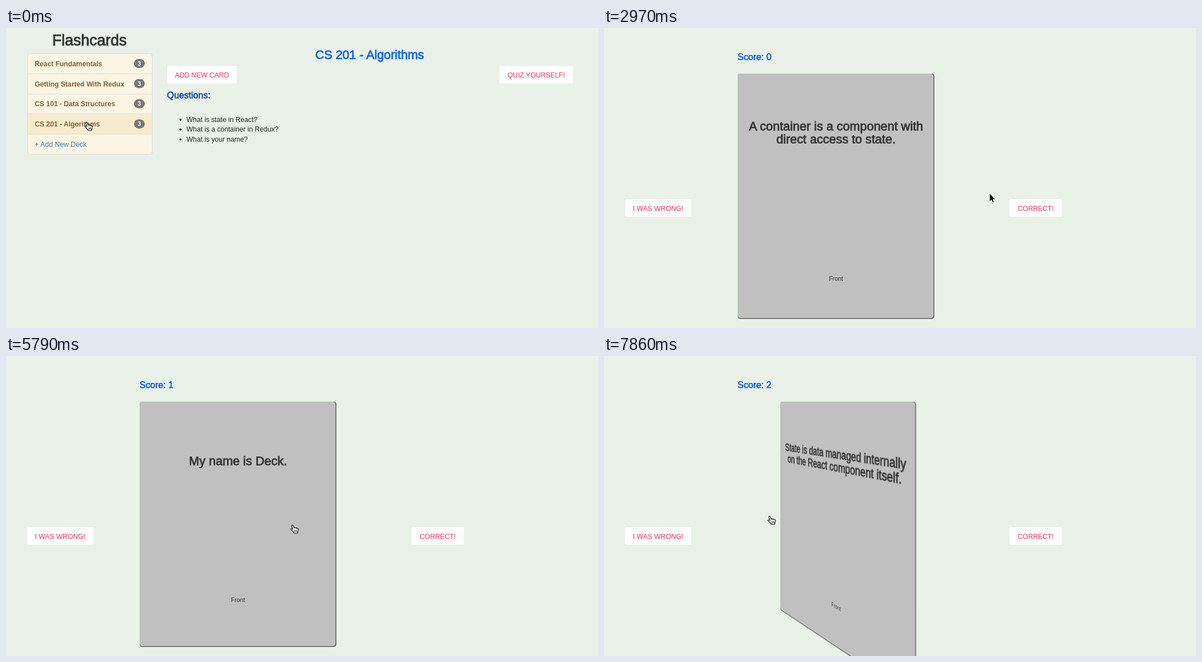
Write an HTML page that moves like this. It is 1050 by 533 pixels and loops after 8 s.

```html
<!DOCTYPE html>
<html lang="en">
<head>
<meta charset="utf-8">
<title>Flashcards</title>
<style>
  html, body { margin: 0; width: 100%; height: 100%; overflow: hidden; background: #eaf1e9; }
  #stage { position: relative; width: 1050px; height: 533px; overflow: hidden; }
  svg { position: absolute; left: 0; top: 0; overflow: visible; font-family: "Liberation Sans", Arial, sans-serif; white-space: pre; }
  #card { left: 237px; top: 81px; transform-origin: 50% 0; }
</style>
</head>
<body>
<div id="stage">
  <svg id="page" width="1050" height="533"><g id="deck"></g><g id="quiz"></g></svg>
  <svg id="card" width="349" height="436"></svg>
  <svg id="pointer" width="1050" height="533">
    <path id="arrow" d="M0 0V13L3 10.2L5 14.6L7 13.8L5.2 9.4H9Z" fill="#000" stroke="#fff" stroke-width=".9" paint-order="stroke"/>
    <g id="hand" fill="#fff" stroke="#000" stroke-width="1.1" stroke-linejoin="round" stroke-linecap="round">
      <path d="M-1.6 1.2C-1.8 -.6 .6 -1 1.2 .8L2.6 5C3 3.8 5 3.8 5.4 5.2C6 4.2 7.6 4.6 7.9 5.8C8.8 5.2 10 5.8 10 7.2C10.2 9.4 9.8 11 8.8 12.2V14H2.4V12.6C.6 11 -1.4 9 -2.8 7.6C-3.6 6.4 -2 5.4 -.8 6.4L.4 7.3Z"/>
      <path d="M3.8 9V11.6M5.6 9V11.6M7.4 9V11.6" stroke-width=".8"/>
    </g>
  </svg>
</div>
<script>
const LOOP = 8000, STEP = 148.35, FLIP = 600, PERSPECTIVE = 1000;
const CARD_MIDDLE = 411.5;
const $ = id => document.getElementById(id);

function add(parent, tag, attrs, content) {
  const el = document.createElementNS('http://www.w3.org/2000/svg', tag);
  for (const key in attrs) el.setAttribute(key, attrs[key]);
  if (content !== undefined) el.textContent = content;
  return parent.appendChild(el);
}
const text = (parent, x, y, size, fill, content, more) =>
  add(parent, 'text', { x, y, 'font-size': size, fill, ...more }, content);
const middle = { 'text-anchor': 'middle' };
const bold = { 'font-weight': 'bold' };
const weight = (stroke, width) => ({ stroke, 'stroke-width': width });

function button(parent, x, y, width, label) {
  const group = add(parent, 'g', {});
  const box = add(group, 'rect', { x, y, width, height: 31, fill: '#fff' });
  text(group, x + width / 2, y + 20.6, 12.25, '#ec4c70', label, { ...middle, ...weight('#ec4c70', 0.2) });
  const hover = on => box.setAttribute('fill', on ? '#e6e6e6' : '#fff');
  return { group, hover, x, y, width };
}

// Deck page
const deck = $('deck');
text(deck, 148, 31, 27, '#333', 'Flashcards', { ...middle, ...weight('#333', 0.9) });
add(deck, 'rect', { x: 38.5, y: 45.5, width: 221, height: 179, rx: 4, fill: '#fcf5e4', stroke: '#dddcd3' });
const activeRow = add(deck, 'rect', { x: 39, y: 153.5, width: 220, height: 35, fill: '#f9ecce' });
['React Fundamentals', 'Getting Started With Redux', 'CS 101 - Data Structures', 'CS 201 - Algorithms'].forEach((name, i) => {
  const y = 63.2 + i * 35.8;
  add(deck, 'path', { d: `M39 ${Math.floor(y + 18) + .5}H259`, stroke: '#dddcd3' });
  text(deck, 51, y + 4.5, 12.23, '#80613b', name, bold);
  add(deck, 'rect', { x: 227, y: y - 8.2, width: 19, height: 16, rx: 8, fill: '#777' });
  text(deck, 236.5, y + 3.5, 10.6, '#fff', '3', { ...middle, ...bold });
});
text(deck, 51, 211, 12.4, '#337ab7', '+ Add New Deck');
text(deck, 645, 55, 21.7, '#0d63ea', 'CS 201 - Algorithms', { ...middle, ...weight('#0d63ea', 0.8) });
button(deck, 286, 67.5, 123, 'ADD NEW CARD');
const quizButton = button(deck, 875.5, 67.5, 130, 'QUIZ YOURSELF!');
text(deck, 285.5, 125, 16.1, '#0a4aa6', 'Questions:', weight('#0a4aa6', 0.6));
['What is state in React?', 'What is a container in Redux?', 'What is your name?'].forEach((question, i) => {
  const y = 166.5 + i * 17.6;
  add(deck, 'circle', { cx: 309.5, cy: y - 3.8, r: 2, fill: '#222' });
  text(deck, 320, y, 12.25, '#222', question);
});

// Quiz page
const quiz = $('quiz'), card = $('card');
const scoreLabel = text(quiz, 237, 57, 16.1, '#0d5fe6', '', weight('#0d5fe6', 0.6));
const wrongButton = button(quiz, 37.5, 304, 117, 'I WAS WRONG!');
const correctButton = button(quiz, 719.5, 304, 92.5, 'CORRECT!');
add(card, 'rect', { width: 349, height: 436, rx: 5, fill: '#666' });
add(card, 'rect', { width: 347.4, height: 434.4, rx: 5, fill: '#c0c0c0' });

function face(lines, link) {
  const group = add(card, 'g', {}), shift = (lines.length - 1) * 11.5;
  lines.forEach((line, i) =>
    text(group, 174.5, 112.7 - shift + i * 23, 21.9, '#333', line, { ...middle, ...weight('#333', 0.8) }));
  text(group, 174.5, 356.3 + shift, 10.8, '#333', link, middle);
  return group;
}
const cards = [
  ['What is a container in Redux?', 'A container is a component with', 'direct access to state.'],
  ['What is your name?', 'My name is Deck.'],
  ['What is state in React?', 'State is data managed internally', 'on the React component itself.']
].map(([question, ...answer]) => [face([question], 'Back'), face(answer, 'Front')]);

// Clicks: the quiz opens, then each click turns the card over or back.
const OPEN_QUIZ = 1250;
const flips = [2160, 3945, 5126, 6378, 7466];

// Pointer strokes between rests: start, end, x, y
const rest = { x: 143, y: 168 };
const strokes = [
  [0, 1190, 906, 76], [1400, 1480, 705, 194], [1640, 1775, 500, 293],
  [2670, 2966, 684, 294.5], [2966, 3400, 769, 324],
  [4004, 4302, 577, 304], [4302, 4894, 331, 289],
  [5487, 6228, 771, 318], [6530, 7267, 294, 285]
];

const clamp = k => Math.max(0, Math.min(1, k));
const smooth = k => k * k * (3 - 2 * k);

function pointerAt(t) {
  return strokes.reduce((from, [start, end, x, y]) => {
    const k = clamp((t - start) / (end - start));
    return { x: from.x + (x - from.x) * k, y: from.y + (y - from.y) * k };
  }, rest);
}

function flipAngle(t, count) {
  if (!count) return 0;
  const turned = smooth(clamp((t - flips[count - 1]) / FLIP));
  return Math.PI * (count % 2 ? turned : 1 - turned);
}

const show = (el, on) => { el.style.display = on ? '' : 'none'; };

function turnCard(angle) {
  const back = angle > Math.PI / 2;
  const tilt = back ? Math.PI - angle : angle;
  // The answer side leans a little deeper while it turns.
  const depth = back ? Math.sin(tilt) + 0.28 * clamp(tilt * 4) : -Math.sin(tilt);
  const width = Math.max(0.001, Math.cos(tilt));
  card.style.transform = `matrix3d(${width.toFixed(5)},0,0,${(-depth / PERSPECTIVE).toFixed(7)},0,1,0,0,0,0,1,0,0,0,0,1)`;
  return back;
}

function draw(t) {
  const inQuiz = t >= OPEN_QUIZ;
  const flipCount = flips.filter(start => start <= t).length;
  const score = Math.floor(flipCount / 2), answering = flipCount % 2 === 1;
  const { x, y } = pointerAt(t);
  const over = b => x > b.x && x < b.x + b.width && y > b.y && y < b.y + 31;
  const overRow = !inQuiz && x < 260 && y > 153;
  const overQuiz = !inQuiz && over(quizButton);
  const overCorrect = answering && over(correctButton);
  const overCard = inQuiz && y > 81 && Math.abs(x - CARD_MIDDLE) < 160;
  const hand = overRow || overQuiz || overCorrect || overCard;

  show(deck, !inQuiz);
  show(quiz, inQuiz);
  show(card, inQuiz);
  show(activeRow, overRow);
  quizButton.hover(overQuiz);
  correctButton.hover(overCorrect);
  show(wrongButton.group, answering);
  show(correctButton.group, answering);
  scoreLabel.textContent = 'Score: ' + score;

  const back = turnCard(flipAngle(t, flipCount));
  cards.forEach(([front, rear], i) => {
    show(front, i === score && !back);
    show(rear, i === score && back);
  });

  show($('arrow'), !hand);
  show($('hand'), hand);
  $('pointer').style.transform = `translate(${x.toFixed(1)}px, ${y.toFixed(1)}px)`;
}

function tick() {
  const t = performance.now() % LOOP;
  draw(Math.floor((t + 6) / STEP) * STEP);
  requestAnimationFrame(tick);
}
tick();
</script>
</body>
</html>
```
